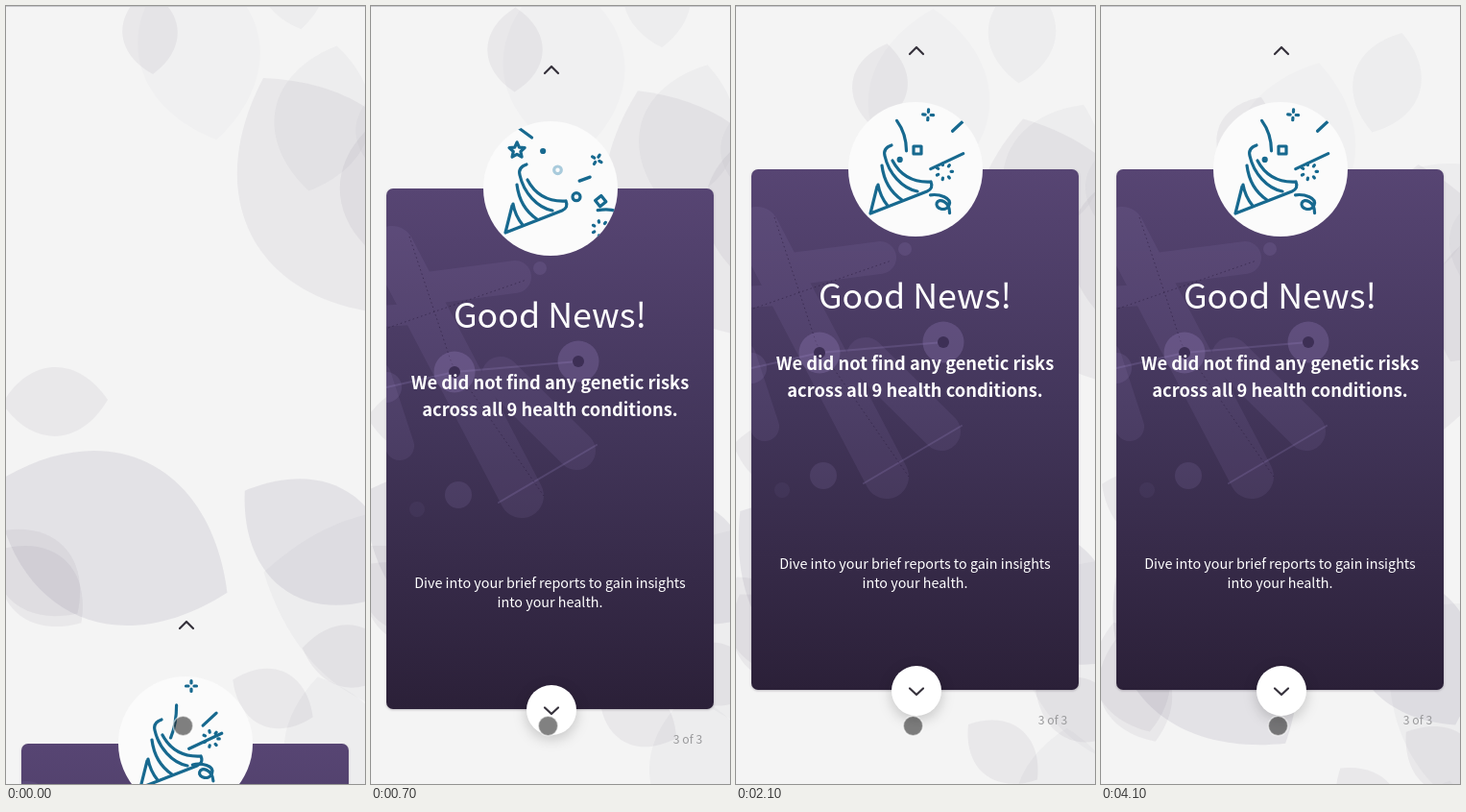
These frames come from a looping animation (374x810 px, 4200 ms). An HTML page:

```html
<!DOCTYPE html>
<html lang="en">
<head>
<meta charset="utf-8">
<title>Results card</title>
<style>
  html, body { margin: 0; height: 100%; overflow: hidden; background: #f4f4f4; }
  svg { display: block; }
  text { font-family: "Noto Sans CJK SC", "Noto Sans CJK JP", "Noto Sans", sans-serif; text-anchor: middle; fill: #fff; }
  .line { fill: none; stroke-linecap: round; stroke-linejoin: round; }
  .chevron { stroke: #35313b; stroke-width: 2.2; }
  #popper { stroke: #17698f; stroke-width: 3.2; }
  #popper .pale { stroke: #a9cbdc; }
  .card { filter: drop-shadow(0 1px 1px rgba(30, 20, 40, .25)); }
  .button { filter: drop-shadow(0 4px 7px rgba(0, 0, 0, .2)); }
</style>
</head>
<body>
<svg width="374" height="810" viewBox="0 0 374 810">
  <defs>
    <linearGradient id="shade" x2="0" y2="1">
      <stop stop-color="#574573"/>
      <stop offset=".45" stop-color="#43365b"/>
      <stop offset="1" stop-color="#2b2038"/>
    </linearGradient>
    <clipPath id="cardClip"><rect x="16" y="170" width="341" height="542" rx="7"/></clipPath>
    <clipPath id="discClip"><circle r="70"/></clipPath>
  </defs>
  <g id="leaves" fill="#5a5073"></g>
  <rect width="374" height="1" fill="#c9c9cd"/>

  <g id="page">
    <path class="line chevron" d="M181 50L188 43L195 50"/>
    <rect class="card" x="16" y="170" width="341" height="542" rx="7" fill="url(#shade)"/>
    <g clip-path="url(#cardClip)" fill="#a78fd0" stroke="#a78fd0">
      <g class="line" opacity=".1">
        <path d="M22 232L157 490" stroke-width="46"/>
        <path d="M50 275L150 262" stroke-width="34"/>
        <path d="M10 303L42 301" stroke-width="22"/>
        <path d="M6 365L30 438" stroke-width="30"/>
        <path d="M135 365L214 443" stroke-width="40"/>
      </g>
      <path class="line" d="M16 377L87 361L216 350M133 497L235 437" stroke-width="2" opacity=".2"/>
      <path d="M40 220L84 352L180 490M18 315L162 265" fill="none" stroke="#251736" stroke-dasharray="1.5 3" opacity=".5"/>
      <g stroke="none">
        <g opacity=".14">
          <circle cx="16" cy="377" r="16"/>
          <circle cx="91" cy="489" r="14"/>
          <circle cx="48" cy="504" r="8" opacity=".5"/>
          <circle cx="176" cy="253" r="7"/>
        </g>
        <g opacity=".24"><circle cx="87" cy="361" r="21.5"/><circle cx="216" cy="350" r="21.5"/></g>
        <g fill="#3d2f55"><circle cx="87" cy="361" r="6"/><circle cx="216" cy="350" r="6"/></g>
      </g>
    </g>
    <text x="186.5" y="315" font-size="35.8">Good News!</text>
    <g font-size="18.3" font-weight="600">
      <text x="186.5" y="379">We did not find any genetic risks</text>
      <text x="186.5" y="407">across all 9 health conditions.</text>
    </g>
    <g font-size="14.35">
      <text x="186.5" y="586">Dive into your brief reports to gain insights</text>
      <text x="186.5" y="606">into your health.</text>
    </g>
    <g transform="translate(187 170)">
      <circle r="70" fill="#fbfbfb"/>
      <g clip-path="url(#discClip)">
        <g id="popper" class="line">
          <path d="M-25-25Q-34-22-32-14C-28 4-14 20 2 23M16 13Q19 20 12 23L-47 46L-40 18M-35-4C-33 12-26 24-14 32M-39 16Q-37 28-29 38M-24-9C-16 6-2 14 16 13"/>
        </g>
      </g>
    </g>
    <circle class="button" cx="188" cy="713" r="26" fill="#fff"/>
    <path class="line chevron" d="M181 710.5L188 717L195 710.5"/>
    <text x="330" y="748" font-size="12.2" style="fill:#9a9a9c">3 of 3</text>
  </g>
  <circle cx="184.5" cy="749.5" r="10.2" fill="#222" fill-opacity=".57" stroke="#fff" stroke-opacity=".55" stroke-width="1.5"/>
</svg>
<script>
const LOOP = 4200, STEP = 100, BURST = 2000, SCROLL_TIME = 1000;
const FALL = 26.5, TURN = 6.5;  // leaf pixels and degrees per second
const $ = id => document.getElementById(id);

function makePath(d, attrs = {}) {
  const el = document.createElementNS("http://www.w3.org/2000/svg", "path");
  el.setAttribute("d", d);
  for (const name in attrs) el.setAttribute(name, attrs[name]);
  return el;
}

const leaves = [];
function addLeaves(opacity, ...places) {
  for (const [x, y, size, tilt] of places) {
    const el = makePath("M0-1C.87-.45.87.45 0 1C-.87.45-.87-.45 0-1Z", { opacity });
    leaves.push({ el: $("leaves").appendChild(el), x, y, size, tilt });
  }
}
// each place: centre, half length, tilt
addLeaves(.025, [201, 44, 97, -11]);
addLeaves(.04, [330, 117, 77, 11], [395, 130, 47, 0], [298, -29, 54, -10], [423, 631, 160, -75], [345, 780, 84, -14]);
addLeaves(.075, [150, 27, 44, -4], [339, 198, 142, -30], [400, 190, 80, 0], [51, 412, 55, 88],
  [32, 590, 60, -45], [36, 604, 57, -48], [358, 677, 50, -80], [278, 721, 46, -65]);
addLeaves(.11, [109, 554, 134, -65], [325, 558, 93, -55]);

const ring = r => `M${-r} 0A${r} ${r} 0 1 1 ${r} 0A${r} ${r} 0 1 1 ${-r} 0Z`;
const polar = (r, angle) => `${r * Math.cos(angle)} ${r * Math.sin(angle)}`;
const rays = (n, from, to) => Array.from({ length: n }, (_, i) => {
  const angle = i * 2 * Math.PI / n;
  return `M${polar(from, angle)}L${polar(to, angle)}`;
}).join("");
const star = "M" + Array.from({ length: 10 }, (_, i) =>
  polar(i % 2 ? 4 : 8.5, (i / 5 - .5) * Math.PI)).join("L") + "Z";

const bits = [];
// A bit follows its route from one time of the burst to another.
function addBit(shape, from, to, route, { turn = 0, ...attrs } = {}) {
  const el = $("popper").appendChild(makePath(shape, attrs));
  bits.push({ el, from, to, turn, route: makePath(route) });
}
addBit("M3-17Q3 2-3 17", -300, 50, "M-16 14L-12-27");
addBit("M-4-16Q5-2 4 16", 60, 250, "M-12-28L-22-56", { turn: -90 });
addBit("M-8-6L7 5", 260, 1300, "M-25-56L-28-60");
addBit("M-7 7L7-6", -150, 300, "M-8 8L78-80");
addBit(rays(4, 3, 5.5), 0, 1300, "M6-60Q40-46 70-4", { turn: 45 });
addBit("M-17 8L17-8", -150, 700, "M2 6L92-36");
addBit(rays(7, 7, 8.5), -50, 1300, "M26-9Q24-4 70 72");
addBit("M-13-7C-4-10 10-8 8 0S-6 6-5 0 8-4 10 8", -100, 800, "M12 24L70 70", { turn: 50 });
addBit(ring(1.5), 60, 1300, "M-17-8Q-4-46-5-62");
addBit("M-4-4H4V4H-4Z", 100, 1300, "M2-20Q48-64 62 74", { turn: 85 });
addBit(star, 200, 1300, "M-3-6Q-10-20-68-68");
addBit(ring(3.8), 400, 1500, "M2 8Q2-8 26-76", { class: "pale" });
addBit("M-16-4Q6-8 16 7", 250, 800, "M6 4L74 30");
addBit(ring(4), 600, 1200, "M15 2L76 36");
addBit("M-5 2L6-2", 600, 1100, "M22-4L78-29");

function drawBit({ el, from, to, turn, route }, time) {
  const phase = (time - from) % BURST;
  const visible = phase >= 0 && phase <= to - from || phase + BURST <= to - from;
  el.style.display = visible ? "" : "none";
  if (!visible) return;
  const age = phase < 0 ? phase + BURST : phase;
  const eased = 1 - (1 - age / (to - from)) ** 1.2;
  const { x, y } = route.getPointAtLength(eased * route.getTotalLength());
  el.setAttribute("transform", `translate(${x} ${y}) rotate(${turn * age / 1000})`);
}

function draw() {
  const time = Math.floor(performance.now() % LOOP / STEP) * STEP, s = time / 1000;
  for (const { el, x, y, size, tilt } of leaves)
    el.setAttribute("transform", `translate(${x} ${y + FALL * s}) rotate(${tilt + TURN * s}) scale(${size})`);
  const scroll = 598 * Math.max(0, 1 - time / SCROLL_TIME) ** 2.82;
  $("page").setAttribute("transform", `translate(0 ${Math.round(scroll)})`);
  for (const bit of bits) drawBit(bit, time);
  requestAnimationFrame(draw);
}
draw();
</script>
</body>
</html>
```
